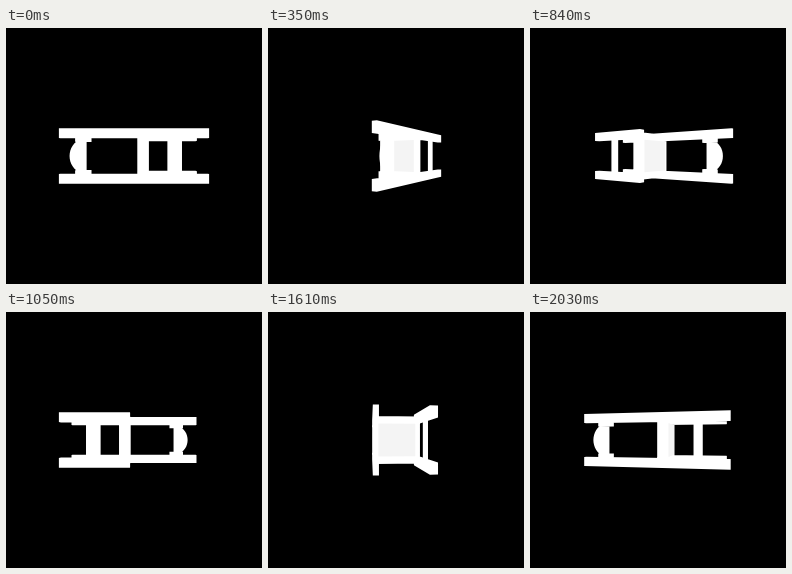
An HTML page that plays this animation: 256 by 256 pixels, repeating every 2.1 s.

```html
<!DOCTYPE html>
<html lang="en">
<head>
<meta charset="utf-8">
<title>Turning chair</title>
<style>
  html, body { margin: 0; width: 100%; height: 100%; overflow: hidden; background: #000; }
  svg { display: block; width: 100vw; height: 100vh; }
</style>
</head>
<body>
<svg viewBox="0 0 256 256">
  <path id="frame" fill="#fff"/>
  <path id="far" fill="#fff"/>
  <path id="panel" fill="#f4f4f4"/>
  <path id="near" fill="#fff"/>
</svg>
<script>
const STEP = 70, STEPS = 30;
const CAMERA = 235, CENTER = 128;
const LENGTH = 67.6, DEPTH = 23.5, WIDTH = 25, INNER = 16.3;
const SEAT_TOP = 3.6, SEAT_BOTTOM = 13.6;
const BACK = [19.2, DEPTH], FRONT = [-DEPTH, -17.5];

// Points are [along the chair, towards its back, across].
function box(along, depth, across) {
  const points = [];
  for (const a of along) for (const b of depth) for (const c of across) points.push([a, b, c]);
  return points;
}

const mirrored = (along, depth, [c0, c1]) =>
  [box(along, depth, [c0, c1]), box(along, depth, [-c1, -c0])];

function crestArc() {
  const points = [];
  for (let i = 0; i <= 20; i++) {
    const angle = Math.PI * i / 20;
    for (const b of BACK) points.push([-43.5 - 14.5 * Math.sin(angle), b, 15.8 * Math.cos(angle)]);
  }
  return points;
}

const body = [
  ...mirrored([-LENGTH, LENGTH], BACK, [INNER, WIDTH]),
  ...mirrored([SEAT_TOP, LENGTH], FRONT, [INNER, WIDTH]),
  box([SEAT_TOP, SEAT_BOTTOM], [-21.5, 20.5], [-22.3, 22.3])
];
const crest = [crestArc(), ...mirrored([-53, -39], BACK, [12.8, 17])];
const rungs = [[19.2, 22], [-22, -19.2]].map(depth => box([36.5, 43.5], depth, [-17, 17]));
const panelAt = a => [box([a], [-17, 18], [-15.5, 15.5])];

function hull(points) {
  const sorted = [...points].sort((p, q) => p[0] - q[0] || p[1] - q[1]);
  const chain = list => {
    const out = [];
    for (const p of list) {
      while (out.length > 1) {
        const [o, q] = out.slice(-2);
        if ((q[0] - o[0]) * (p[1] - o[1]) - (q[1] - o[1]) * (p[0] - o[0]) > 0) break;
        out.pop();
      }
      out.push(p);
    }
    return out.slice(0, -1);
  };
  return [...chain(sorted), ...chain(sorted.reverse())];
}

function draw(id, solids, angle) {
  const cos = Math.cos(angle), sin = Math.sin(angle);
  const project = ([a, b, c]) => {
    const scale = CAMERA / (CAMERA - (b * cos - a * sin));
    return [CENTER + (a * cos + b * sin) * scale, CENTER + c * scale];
  };
  const outline = solid =>
    'M' + hull(solid.map(project)).map(p => p.map(v => v.toFixed(2)).join(' ')).join('L') + 'Z';
  document.getElementById(id).setAttribute('d', solids.map(outline).join(''));
}

function render(time) {
  const angle = Math.floor(time / STEP) % STEPS * 2 * Math.PI / STEPS;
  const side = Math.sin(angle);
  const fromTop = side > 0;
  draw('frame', body, angle);
  draw('far', fromTop ? rungs : crest, angle);
  draw('panel', Math.abs(side) > 0.1 ? panelAt(fromTop ? SEAT_TOP : SEAT_BOTTOM) : [], angle);
  draw('near', fromTop ? crest : rungs, angle);
}

const start = performance.now();
function tick() {
  render(performance.now() - start);
  requestAnimationFrame(tick);
}
tick();
</script>
</body>
</html>
```
